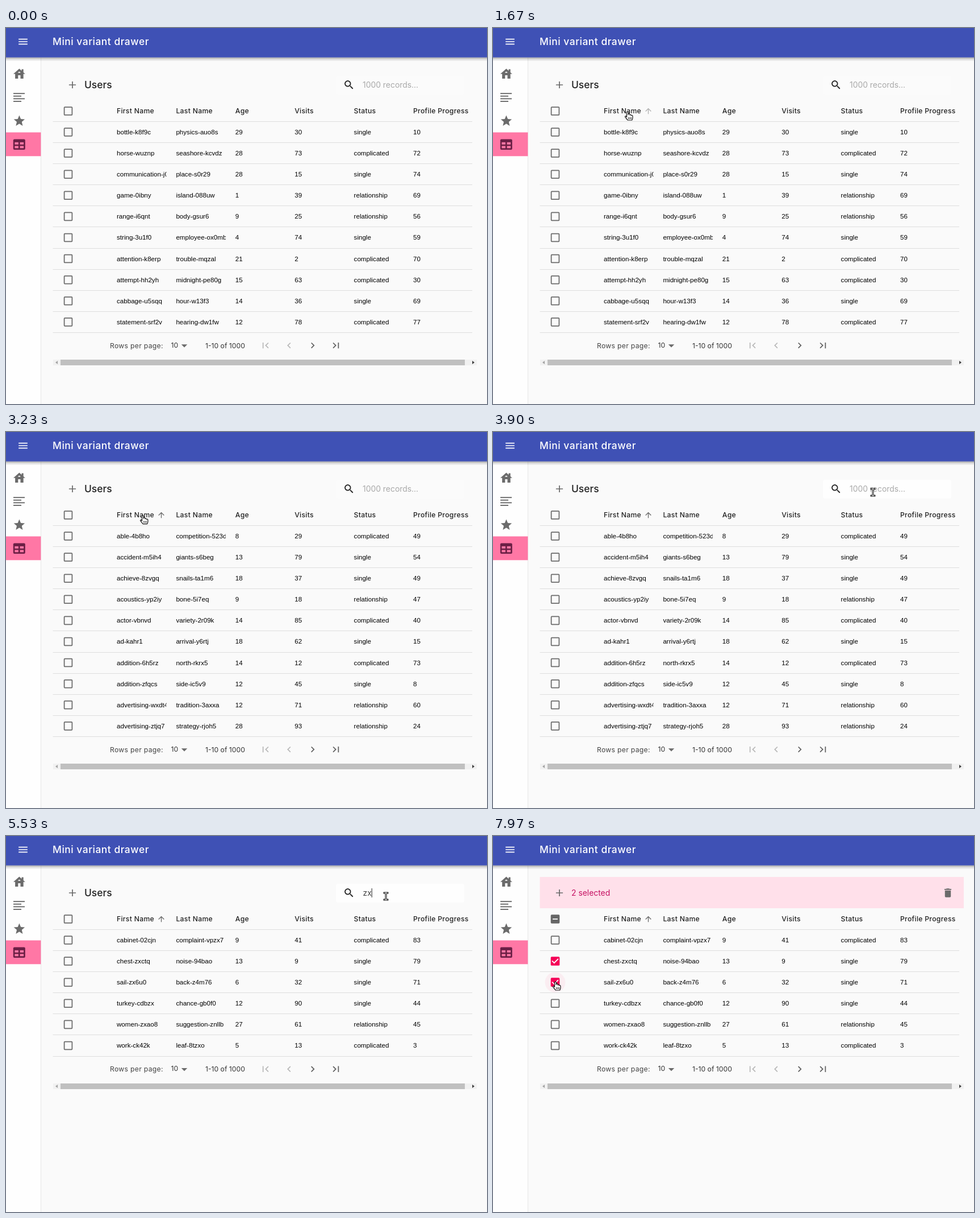
Animation of 847x661 px, one loop 8000 ms. Source, as an HTML page:

```html
<!DOCTYPE html>
<html lang="en">
<head>
<meta charset="utf-8">
<title>Mini variant drawer</title>
<style>
  html, body { margin: 0; width: 100%; height: 100%; overflow: hidden; background: #fafafa; }
  svg { display: block; }
  text { font: 400 12.18px Inter, sans-serif; fill: #212121; white-space: pre; }
  .title { font-size: 17.4px; font-weight: 500; letter-spacing: .03em; }
  .section { font-size: 17.4px; font-weight: 500; }
  .head { font-weight: 500; letter-spacing: .025em; }
  .body { font-size: 13.9px; }
  .spaced { letter-spacing: .025em; }
  .cell { font: 11.6px "Liberation Sans", Arial, sans-serif; fill: #000; }
</style>
</head>
<body>
<svg id="stage" width="847" height="661" viewBox="0 0 847 661">
  <defs>
    <linearGradient id="shadow" x2="0" y2="1">
      <stop stop-opacity=".36"/><stop offset=".4" stop-opacity=".14"/><stop offset="1" stop-opacity="0"/>
    </linearGradient>
  </defs>
  <rect width="847" height="661" fill="#fafafa"/>
  <g id="frame"></g>
  <g id="content"></g>
  <g id="pointer"></g>
</svg>
<script>
const DURATION = 8000;
const ROW_TOP = 164.4, ROW_HEIGHT = 37.1, CHECK_X = 109.5;
const GREY = '#6b6b6b', PINK = '#f50057', ROSE = '#ff77a5';
const columnX = i => 195 + 104.4 * i;
const rowY = i => ROW_TOP + ROW_HEIGHT * (i + .5);

const TIMES = { arrowHover: 1340, sort: 1850, focus: 4250, typeZ: 4750, typeX: 5250, check1: 7000, check2: 7720 };

const parse = rows => rows.trim().split('\n').map(row => row.trim().split(' '));
const unsorted = parse(`
  bottle-k8f9c physics-auo8s 29 30 single 10
  horse-wuznp seashore-kcvdz 28 73 complicated 72
  communication-j0f place-s0r29 28 15 single 74
  game-0ibny island-088uw 1 39 relationship 69
  range-i6qnt body-gsur6 9 25 relationship 56
  string-3u1f0 employee-ox0mb 4 74 single 59
  attention-k8erp trouble-mqzal 21 2 complicated 70
  attempt-hh2yh midnight-pe80g 15 63 complicated 30
  cabbage-u5sqq hour-w13f3 14 36 single 69
  statement-srf2v hearing-dw1fw 12 78 complicated 77`);
const sorted = parse(`
  able-4b8ho competition-523d 8 29 complicated 49
  accident-m5ih4 giants-s6beg 13 79 single 54
  achieve-8zvgq snails-ta1m6 18 37 single 49
  acoustics-yp2iy bone-5i7eq 9 18 relationship 47
  actor-vbnvd variety-2r09k 14 85 complicated 40
  ad-kahr1 arrival-y6rtj 18 62 single 15
  addition-6h5rz north-rkrx5 14 12 complicated 73
  addition-zfqcs side-ic5v9 12 45 single 8
  advertising-wxdt4 tradition-3axxa 12 71 relationship 60
  advertising-ztjq7 strategy-rjoh5 28 93 relationship 24`);
const withZ = sorted.filter(row => row.join().includes('z')).concat(parse(`
  airport-z2k4d garden-p0v1e 16 51 single 38
  amount-q7zlb window-m3t8a 22 8 complicated 91
  apple-h1wz5 letter-c9x2r 5 67 relationship 12
  army-zu80n paper-k4f6s 11 34 single 57
  bath-3gzpe river-t2y7o 27 19 complicated 65
  battle-rz9c1 stone-b5n0j 3 82 relationship 29`));
const withZX = parse(`
  cabinet-02cjn complaint-vpzx7 9 41 complicated 83
  chest-zxctq noise-94bao 13 9 single 79
  sail-zx6u0 back-z4m76 6 32 single 71
  turkey-cdbzx chance-gb0f0 12 90 single 44
  women-zxao8 suggestion-znllb 27 61 relationship 45
  work-ck42k leaf-8tzxo 5 13 complicated 3`);

const ICONS = {
  menu: 'M3 18h18v-2H3zm0-5h18v-2H3zm0-7v2h18V6z',
  house: 'M19 9.3V4h-3v2.6L12 3 2 12h3v8h5v-6h4v6h5v-8h3zM10 10c0-1.1.9-2 2-2s2 .9 2 2z',
  star: 'M12 17.27L18.18 21l-1.64-7.03L22 9.24l-7.19-.61L12 2 9.19 8.63 2 9.24l5.46 4.73L5.82 21z',
  add: 'M19 13h-6v6h-2v-6H5v-2h6V5h2v6h6z',
  search: 'M15.5 14h-.79l-.28-.27C15.41 12.59 16 11.11 16 9.5 16 5.91 13.09 3 9.5 3S3 5.91 3 9.5 5.91 16 9.5 16c1.61 0 3.09-.59 4.23-1.57l.27.28v.79l5 4.99L20.49 19zm-6 0C7.01 14 5 11.99 5 9.5S7.01 5 9.5 5 14 7.01 14 9.5 11.99 14 9.5 14z',
  up: 'M4 12l1.41 1.41L11 7.83V20h2V7.83l5.58 5.59L20 12l-8-8z',
  down: 'M6 10l6 6 6-6z',
  first: 'M18.41 16.59L13.82 12l4.59-4.59L17 6l-6 6 6 6zM6 6h2v12H6z',
  prev: 'M15.41 7.41L14 6l-6 6 6 6 1.41-1.41L10.83 12z',
  next: 'M10 6L8.59 7.41 13.17 12l-4.58 4.59L10 18l6-6z',
  last: 'M5.59 7.41L10.18 12l-4.59 4.59L7 18l6-6-6-6zM16 6h2v12h-2z',
  trash: 'M6 19c0 1.1.9 2 2 2h8c1.1 0 2-.9 2-2V7H6zM19 4h-3.5l-1-1h-5l-1 1H5v2h14z',
};

const rect = (x, y, w, h, fill, extra = '') => `<rect x="${x}" y="${y}" width="${w}" height="${h}" fill="${fill}" ${extra}/>`;
const path = (d, fill, extra = '') => `<path d="${d}" fill="${fill}" ${extra}/>`;
const text = (x, y, value, style, fill) =>
  `<text x="${x}" y="${y}" class="${style}"${fill ? ` style="fill:${fill}"` : ''}>${value}</text>`;
const icon = (name, x, y, fill = GREY, scale = .87, opacity = 1) =>
  path(ICONS[name], fill, `opacity="${opacity}" transform="translate(${x} ${y}) scale(${scale}) translate(-12 -12)"`);

function frameMarkup() {
  const tableIcon = rect(12.8, 195.6, 21, 18.3, '#6b1f45', 'rx="2"') +
    [15.4, 24.6].map(x => [200.9, 207.4].map(y => rect(x, y, 6.5, 3.9, ROSE)).join('')).join('');
  const lines = [20, 14, 20, 14].map((w, i) => rect(13, 114.2 + 4.6 * i, w, 1.9, GREY)).join('');
  return rect(0, 52, 61, 609, '#fefefe') + rect(61, 52, 1, 609, '#e6e6e6') +
    rect(0, 51.7, 847, 7, 'url(#shadow)') + rect(0, 0, 847, 51.7, '#3f51b5') +
    icon('menu', 30, 24, '#fff') + text(82, 30, 'Mini variant drawer', 'title', '#fff') +
    icon('house', 23.4, 80.8, GREY, 1.04) + lines + icon('star', 23.4, 163.2, GREY, .97) +
    rect(0, 183.5, 61.4, 41.8, ROSE) + tableIcon;
}

function checkbox(y, state, color) {
  const x = CHECK_X - 7.8, top = y - 7.8;
  if (!state) return rect(x + .9, top + .9, 13.8, 13.8, 'none', `rx="1" stroke="${GREY}" stroke-width="1.75"`);
  const mark = state === 'dash' ? 'm-4.4 0h8.8' : 'm-5.5-.6l3.75 3.7 7.2-7.2';
  return rect(x, top, 15.6, 15.6, color, 'rx="1.7"') +
    path(`M${CHECK_X} ${y}${mark}`, 'none', 'stroke="#fff" stroke-width="1.75"');
}

function toolbar(t, selected, hovered) {
  if (selected) {
    return rect(82.5, 72, 746.5, 55, '#ffe0ea') + icon('add', 117, 100) +
      text(138, 104.5, `${selected} selected`, 'body', '#c51162') + icon('trash', 801, 100);
  }
  const query = t < TIMES.typeZ ? '' : t < TIMES.typeX ? 'z' : 'zx';
  const lastEdit = [TIMES.focus, TIMES.typeZ, TIMES.typeX].filter(time => time <= t).pop();
  const caretOn = lastEdit && Math.floor((t - lastEdit) / 500) % 2 === 0;
  return icon('add', 117, 100) + text(138, 106, 'Users', 'section') +
    rect(581, 84, 226, 33, hovered ? '#fefefe' : '#fbfbfb', 'rx="3.5"') + icon('search', 604, 100, '#212121') +
    (query ? text(628.5, 105, query, 'body', '#444') : text(628, 105, '1000 records...', 'body', '#a9a9a9')) +
    (caretOn ? rect(628.5 + 7.6 * query.length, 92, 1, 16, '#222') : '');
}

function table(rows, checked, arrowOpacity, hoverRow) {
  const headers = ['First Name', 'Last Name', 'Age', 'Visits', 'Status', 'Profile Progress'];
  let out = checkbox(146, checked.length && 'dash', '#666') +
    headers.map((name, i) => text(columnX(i), 150.3, name, 'head')).join('') +
    (arrowOpacity ? icon('up', 273.5, 146, GREY, .66, arrowOpacity) : '') +
    rect(82.5, 164, 738.5, 1, '#dedede');
  rows.forEach((row, i) => {
    const y = rowY(i);
    if (i === hoverRow) out += `<circle cx="${CHECK_X}" cy="${y}" r="18" fill="${PINK}" opacity=".05"/>`;
    out += checkbox(y, checked.includes(i) && 'tick', PINK) +
      row.map((value, c) => `<svg x="${columnX(c)}" y="${y - 18}" width="87.5" height="36">${text(0, 22, value, 'cell')}</svg>`).join('') +
      rect(82.5, Math.floor(ROW_TOP + ROW_HEIGHT * (i + 1)), 738.5, 1, '#dedede');
  });
  return out;
}

function footer(rowCount) {
  const y = ROW_TOP + ROW_HEIGHT * rowCount + 22.7, bar = Math.round(y + 25);
  return text(183, y + 4.5, 'Rows per page:', 'spaced', '#444') + text(290.5, y + 3.7, '10', '', '#333') +
    icon('down', 314, y, GREY) + text(351, y + 4.5, '1-10 of 1000', '', '#333') +
    icon('first', 457, y, '#b8b8b8') + icon('prev', 498.5, y, '#b8b8b8') +
    icon('next', 540, y, '#606060') + icon('last', 581, y, '#606060') +
    rect(83, bar, 746, 10, '#f1f1f1') + rect(96, bar, 712, 10, '#c0c0c0') +
    path(`M87 ${bar + 5}l4-3v6z`, '#a3a3a3') + path(`M825 ${bar + 5}l-4-3v6z`, '#404040');
}

const PATH = [
  [250, 862, 310], [700, 419, 199], [900, 419, 199], [1400, 237, 147], [3200, 237, 147],
  [3750, 669, 106], [5560, 669, 106], [6500, 113, 219], [7250, 113, 219], [7600, 110, 256],
];
function pointerAt(t) {
  const next = PATH.findIndex(key => key[0] > t);
  if (next === 0) return null;
  const b = next < 0 ? PATH.at(-1) : PATH[next], a = next < 0 ? b : PATH[next - 1];
  const u = a === b ? 1 : (t - a[0]) / (b[0] - a[0]), eased = u * u * (3 - 2 * u);
  return { x: a[1] + (b[1] - a[1]) * eased, y: a[2] + (b[2] - a[2]) * eased };
}

const outline = 'stroke="#111" stroke-width="1.2" stroke-linejoin="round"';
const beamShape = 'M-2.8-6H2.8M0-6V6M-2.8 6H2.8';
const CURSORS = {
  arrow: path('M.6 .6v15l3.5-3.2 2.4 5.2 2.4-1.1-2.4-5.1h4.7z', '#fff', outline),
  hand: path('M-1.5 9.5V1.3C-1.5-.4 1.2-.4 1.2 1.3V5.5C2-.1 4 4.7 4 6 5 5 6.5 5.6 6.5 6.8 7.5 6 8.9 6.6 8.9 8V11.5L7.7 15H.2L-4.2 9.6C-5 8.2-3.2 7.2-2.4 8.4z', '#fff', outline) +
    path('M1.7 10v3M4 10v3M6.2 10v3', 'none', 'stroke="#111"'),
  beam: path(beamShape, 'none', 'stroke="#111" stroke-width="3" stroke-linecap="square"') +
    path(beamShape, 'none', 'stroke="#fff" stroke-width="1"'),
};

const setMarkup = (id, markup) => {
  const node = document.getElementById(id);
  if (node.markup !== markup) node.innerHTML = node.markup = markup;
};

function render(t) {
  const pointer = pointerAt(t);
  const inside = (x0, y0, x1, y1) =>
    pointer && pointer.x >= x0 && pointer.x <= x1 && pointer.y >= y0 && pointer.y <= y1;
  const rows = t < TIMES.sort ? unsorted : t < TIMES.typeZ ? sorted : t < TIMES.typeX ? withZ : withZX;
  const checked = [];
  if (t >= TIMES.check1) checked.push(1);
  if (t >= TIMES.check2) checked.push(2);
  const overSearch = !checked.length && inside(581, 84, 807, 117);
  const overHeader = inside(195, 136, 282, 156);
  const hoverRow = rows.findIndex((_, i) => inside(91, rowY(i) - 18, 128, rowY(i) + 18));
  const fade = start => Math.min(1, Math.max(0, (t - start) / 200)) / 2;

  setMarkup('content', toolbar(t, checked.length, overSearch) +
    table(rows, checked, fade(TIMES.arrowHover) + fade(TIMES.sort), hoverRow) + footer(rows.length));
  const shape = overSearch ? 'beam' : overHeader || hoverRow >= 0 ? 'hand' : 'arrow';
  setMarkup('pointer', pointer ? `<g transform="translate(${pointer.x} ${pointer.y})">${CURSORS[shape]}</g>` : '');
}

setMarkup('frame', frameMarkup());
const start = performance.now();
function tick() {
  render((performance.now() - start) % DURATION);
  requestAnimationFrame(tick);
}
tick();
</script>
</body>
</html>
```
